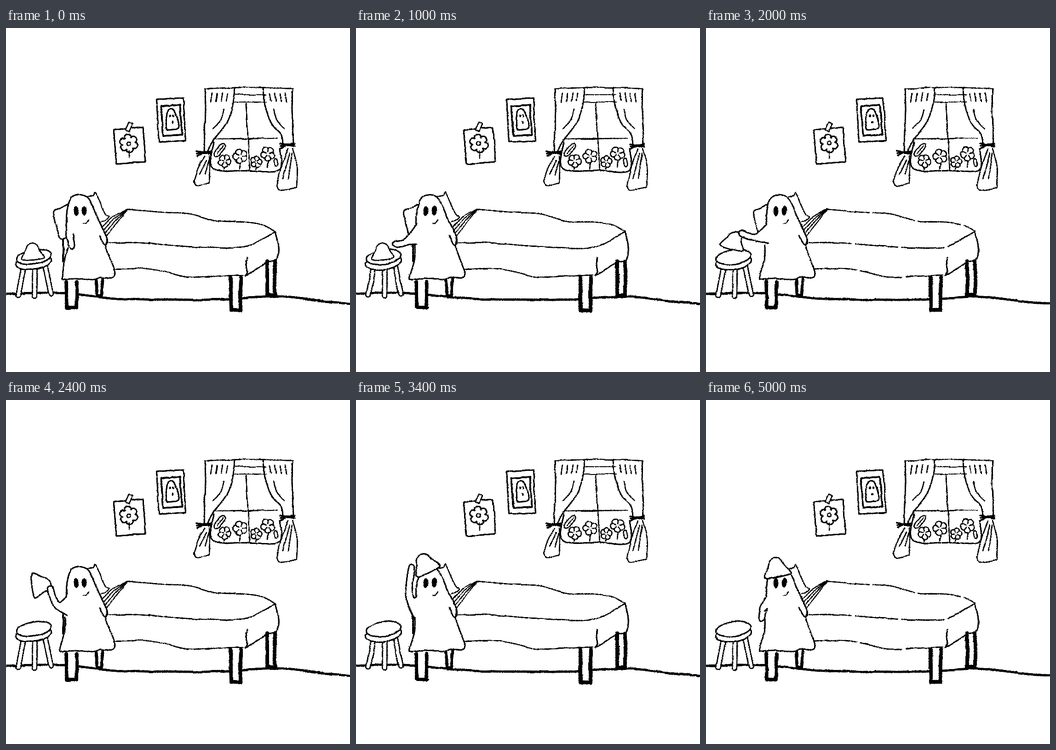
Animation, 748 px wide and 748 px high, one loop 5100 ms. Source, as an HTML page:

```html
<!DOCTYPE html>
<html lang="en">
<head>
<meta charset="utf-8">
<title>Ghost puts on a hat</title>
<style>
  html, body { margin: 0; width: 100%; height: 100%; overflow: hidden; background: #fff; }
  svg { display: block; width: 100vw; height: 100vh; }
  path { stroke: #000; stroke-linecap: round; stroke-linejoin: round; }
  .v0 .dash { stroke-dasharray: 118 3; }
  .v1 .dash { stroke-dasharray: 150 3; }
  .v2 .dash { stroke-dasharray: 92 9; }
  .v2 .rail { display: none; }
</style>
</head>
<body>
<svg id="stage" viewBox="0 0 748 748">
  <filter id="ink" filterUnits="userSpaceOnUse" x="0" y="0" width="748" height="748" color-interpolation-filters="sRGB">
    <feTurbulence class="noise" type="fractalNoise" baseFrequency=".03" numOctaves="1" result="wave"/>
    <feTurbulence class="noise" type="fractalNoise" baseFrequency=".45" numOctaves="1" result="grain"/>
    <feDisplacementMap in="SourceGraphic" in2="wave" scale="4" xChannelSelector="R" yChannelSelector="G"/>
    <feDisplacementMap in2="grain" scale="3" xChannelSelector="R" yChannelSelector="G"/>
    <feComponentTransfer>
      <feFuncR type="linear" slope="2.4" intercept="-.7"/>
      <feFuncG type="linear" slope="2.4" intercept="-.7"/>
      <feFuncB type="linear" slope="2.4" intercept="-.7"/>
    </feComponentTransfer>
  </filter>
  <g id="scene" filter="url(#ink)"><rect width="748" height="748" fill="#fff"/></g>
</svg>
<script>
const stage = document.getElementById('stage');
const scene = document.getElementById('scene');
const noise = document.querySelectorAll('.noise');
const LOOP = 5100, STEP = 100, THIN = 2.6, PEN = 3.1;

const nums = s => s.split(' ').map(Number);
const mix = (a, b, u) => a + (b - a) * u;
const ramp = (t, a, b) => {
  const u = Math.max(0, Math.min(1, (t - a) / (b - a)));
  return u * u * (3 - 2 * u);
};
const rotate = (x, y, deg) => {
  const a = deg * Math.PI / 180, c = Math.cos(a), s = Math.sin(a);
  return [x * c - y * s, x * s + y * c];
};

// Smooth curve through a flat list of x, y
function spline(v, closed) {
  const n = v.length / 2;
  const at = i => {
    i = closed ? (i + n) % n : Math.max(0, Math.min(n - 1, i));
    return [v[2 * i], v[2 * i + 1]];
  };
  let d = 'M' + at(0);
  for (let i = 0; i < (closed ? n : n - 1); i++) {
    const [a, b, c, e] = [at(i - 1), at(i), at(i + 1), at(i + 2)];
    const p = k => b[k] + (c[k] - a[k]) / 6;
    const q = k => c[k] - (e[k] - b[k]) / 6;
    d += `C${p(0)} ${p(1)} ${q(0)} ${q(1)} ${c}`;
  }
  return d + (closed ? 'Z' : '');
}

function add(d, width, fill = 'none', cls = '') {
  const el = document.createElementNS('http://www.w3.org/2000/svg', 'path');
  el.setAttribute('d', d);
  el.setAttribute('fill', fill);
  el.setAttribute('stroke-width', width);
  el.setAttribute('class', cls);
  scene.append(el);
  return el;
}

const line = (width, ...v) => add(spline(v), width);
const sketch = (width, s, cls) => add(spline(nums(s)), width, 'none', cls);
const blob = (width, s) => add(spline(nums(s), true), width, '#fff');

// Closed shape sampled from a radius function of the angle
function round(x, y, rx, ry, width, { tilt = 0, wave = () => 1, n = 60, fill = '#fff' } = {}) {
  const v = [];
  for (let i = 0; i < n; i++) {
    const a = i / n * 2 * Math.PI, k = wave(a);
    const [px, py] = rotate(rx * k * Math.cos(a), ry * k * Math.sin(a), tilt);
    v.push(x + px, y + py);
  }
  return add(spline(v, true), width, fill);
}

const dot = (x, y, rx, ry) => round(x, y, rx, ry, .5, { fill: '#000' });
const flower = (x, y, r, lobes, tilt, width) => round(x, y, r, r, width,
  { tilt, wave: a => .68 + .32 * Math.sqrt(Math.abs(Math.cos(lobes * a / 2))) });

function frame(x, y, w, h, tilt, width) {
  const corners = [[-1, -1], [1, -1], [1, 1], [-1, 1]].map(([i, j]) => {
    const [px, py] = rotate(i * w / 2, j * h / 2, tilt);
    return [x + px, y + py];
  });
  add('M' + corners.join('L') + 'Z', width, '#fff');
}

// Bed leg: an open-topped U
const leg = (x, y, w, h, lean, width) =>
  add(`M${x} ${y}l${lean} ${h}h${w - 2 * lean}l${lean} ${-h}`, width, '#fff');

function stoolLeg(x0, y0, x1, y1) {
  line(12.5, x0, y0, x1, y1);
  line(7, x0, y0, x1, y1).style.stroke = '#fff';
}

// Half a pair of curtains; dir points to the middle of the window
function curtain(x, tx, ty, dir, drop, flare) {
  const X = k => x + dir * k;
  line(PEN, x, 132, X(1), 180, X(-1), ty - 45, X(-2), ty - 3);
  line(PEN, X(64), 131, X(60), 168, X(46), 207, mix(X(46), tx, .6), ty - 26, tx + dir * 9, ty - 5);
  for (let i = 0; i < 4; i++) line(THIN, X(16 + 11 * i), 141 + i % 2, X(13 + 11 * i), 161 - i);
  line(THIN, X(41), 176, X(34), 200, X(17), 219);
  for (let i = 0; i < 3; i++) line(3.6, tx - 15 + i, ty - 4 + 5 * i, tx, ty - 2 + i, tx + 16, ty - 4 + 3 * i);
  const foot = ty + drop;
  line(THIN, tx + 2, ty + 7, tx - 12, ty + drop / 2, tx - 22, foot - 3);
  line(THIN, tx + 12, ty + 6, tx + flare + 1, ty + drop / 2, tx + flare, foot);
  line(THIN, tx - 22, foot - 3, tx - 14, foot + 7, tx + flare, foot + 1);
  for (let i = 0; i < 2; i++) line(THIN, tx + 6 + 5 * i, ty + 16, tx - 9 + 12 * i, foot - 18);
}

// Window
line(THIN, 434, 132, 530, 129, 623, 132);
for (const y of [145, 161]) line(THIN, 497, y, 566, y);
line(THIN, 522, 164, 526, 240, 530, 309);
line(THIN, 455, 241, 590, 240);
sketch(PEN, '452 248 450 305 530 310 594 309 595 262');
for (const [x, y, r] of [[475, 289, 14], [509, 279, 15.5], [544, 291, 12.5], [569, 273, 15]]) {
  const turn = x * 7 % 72;
  line(THIN, x + 1, y + r - 3, x - 1, Math.min(307, y + 2 * r));
  flower(x, y, r, 5, turn, THIN);
  for (let i = 0; i < 5; i++) {
    const [c, s] = rotate(r, 0, turn + 36 + 72 * i);
    line(2.4, x + c * .25, y + s * .25, x + c * .65, y + s * .65);
  }
}
const pointed = { wave: a => .6 + .4 * Math.cos(a) ** 2 };
round(465, 265, 17, 10, THIN, { ...pointed, tilt: -50 });
line(2, 473, 256, 459, 273);
round(586, 292, 9, 6, THIN, { ...pointed, tilt: 80 });
curtain(433, 430, 272, 1, 64, 12);
curtain(623, 611, 256, -1, 90, 21);

// Pictures on the wall
frame(269, 256, 64, 75, -4.5, PEN);
flower(267, 251, 20, 6, 20, PEN);
round(267, 251, 4, 4, THIN);
line(THIN, 268, 267, 268, 283);
frame(267.5, 215, 9, 19, 24, THIN);
frame(359, 200, 58, 93, -3, PEN);
frame(360, 201, 41, 65, -4, 3.8);
blob(PEN, '349 218 350 186 357 176 367 181 376 215 360 221');
for (const [x, y] of [[357, 191], [364, 191], [362, 205]]) dot(x, y, 2, 3);

// Floor and stool
sketch(4.8, '0 578 60 576 130 577 200 584 258 589 400 591 482 590 560 585 620 586 700 596 748 599');
stoolLeg(38, 522, 27, 580);
stoolLeg(63, 522, 62, 583);
stoolLeg(85, 516, 98, 579);
round(60, 509, 39, 16, PEN, { tilt: -8 });
round(60, 498, 38, 15.5, PEN, { tilt: -8 });

// Bed
leg(196, 546, 14, 35, 2, 6.5);
leg(568, 507, 17, 74, 0, 8);
leg(131, 552, 23, 56, 1, 7.5);
leg(488, 542, 23, 72, 1, 8.5);
const pillow = sketch(PEN, '140 380 120 391 104 399 109 428 119 458 132 456');
sketch(THIN, '178 366 190 364 195 358 207 385 217 405 224 411 217 418 208 421');
add('M124 460V508', 3.4, 'none', 'rail');
sketch(THIN, '262 394 345 401 400 404 458 420 520 422 558 428 585 443', 'dash');
sketch(THIN, '224 467 290 467 365 473 430 477 500 478 535 471 584 444', 'dash');
sketch(THIN, '235 525 300 523 345 530 390 541 430 541 515 537', 'dash');
sketch(PEN, '585 443 592 475 588 503 568 509 548 523 523 537');
sketch(PEN, '525 499 523 515 525 530 520 538');
for (let u = 0; u <= 1; u += .33)
  line(2.3, mix(209, 219, u), mix(433, 452, u), mix(232, 240, u), mix(411, 425, u), mix(261, 264, u), 395);

// Ghost
const BODY = nums('133 395 141 371 158 363 175 367 186 383 196 406 211 438 220 460 217 474 222 490 ' +
  '230 513 237 533 231 543 206 542 190 547 150 545');
const body = add('', PEN, '#fff');
sketch(PEN, '220 459 220 469 214 472 208 462 203 451');
dot(152, 398, 5.2, 10.5);
dot(170, 397, 5.2, 10.5);
sketch(THIN, '168 425 174 424 179 417');
const hat = blob(PEN, '-28 0 -19 -18 -14 -31 -2 -38 11 -33 17 -20 28 -4 26 1 10 4 -10 6 -25 5');
const arm = add('', PEN, '#fff');

// Held from, until, elbow x y, hand x y, armpit x y
const POSES = [
  [0, 400, 140, 456, 143, 475, 147, 449],
  [1000, 1400, 109, 472, 84, 470, 132, 470],
  [2000, 2000, 105, 462, 76, 446, 136, 468],
  [2900, 2900, 104, 448, 127, 360, 127, 468],
  [3400, 3700, 107, 436, 121, 364, 127, 476],
  [4100, 4300, 112, 443, 96, 453, 125, 453],
  [4700, LOOP, 124, 452, 121, 475, 127, 459]
];
const SHOULDER = [131, 428];

function poseAt(t) {
  const i = POSES.findLastIndex(p => p[0] <= t);
  const a = POSES[i], b = POSES[i + 1] || a;
  const u = ramp(t, a[1], b[0] + (a === b));
  return a.slice(2).map((v, k) => mix(v, b[k + 2], u));
}

// Tapered limb along a quadratic curve from shoulder to hand
function armShape([ex, ey, hx, hy, px, py]) {
  const sx = (SHOULDER[0] + px) / 2, sy = (SHOULDER[1] + py) / 2;
  const upper = [], lower = [];
  let tip;
  for (const u of [.4, .7, 1]) {
    const x = mix(mix(sx, ex, u), mix(ex, hx, u), u), y = mix(mix(sy, ey, u), mix(ey, hy, u), u);
    const dx = mix(ex - sx, hx - ex, u), dy = mix(ey - sy, hy - ey, u);
    const w = (6 + 6 * (1 - u) ** 2) / Math.hypot(dx, dy);
    upper.push(x - dy * w, y + dx * w);
    lower.unshift(x + dy * w, y - dx * w);
    tip = [x + dx * w, y + dy * w];
  }
  return spline([...SHOULDER, ...upper, ...tip, ...lower, px, py]);
}

// The hat swings round the hand, then settles on the head
function hatAt(t, hand) {
  const lift = ramp(t, 1400, 2000), swing = ramp(t, 2000, 2900);
  const land = ramp(t, 2900, 3400), settle = ramp(t, 3600, 3900);
  const turn = 20 * lift + 164 * swing + 157 * land + 12 * settle;
  const [gx, gy] = rotate(-8, 36, turn);
  const x = mix(mix(58, hand[0] + gx, lift), 156, land);
  const y = mix(mix(500, hand[1] + gy, lift), 371 + 9 * settle, land);
  return `translate(${x} ${y}) rotate(${turn}) scale(${.85 + .08 * lift + .07 * swing})`;
}

function draw(step) {
  const t = step * STEP, boil = step % 3;
  const pose = poseAt(t);
  const lean = 6 * (1 - ramp(t, 400, 900));
  stage.setAttribute('class', 'v' + boil);
  noise.forEach((n, i) => n.setAttribute('seed', 3 + boil * 7 + i));
  arm.setAttribute('d', armShape(pose));
  body.setAttribute('d', spline([...SHOULDER, ...BODY,
    121 + lean / 2, 547, 117 + lean, 541, 127, 505, 128 + lean, 472 + lean]));
  hat.setAttribute('transform', hatAt(t, pose.slice(2, 4)));
  pillow.setAttribute('visibility', t < 2400 ? 'visible' : 'hidden');
}

let shown = -1;
function tick(now) {
  const step = Math.floor((now % LOOP) / STEP);
  if (step !== shown) draw(shown = step);
  requestAnimationFrame(tick);
}
draw(0);
requestAnimationFrame(tick);
</script>
</body>
</html>
```
